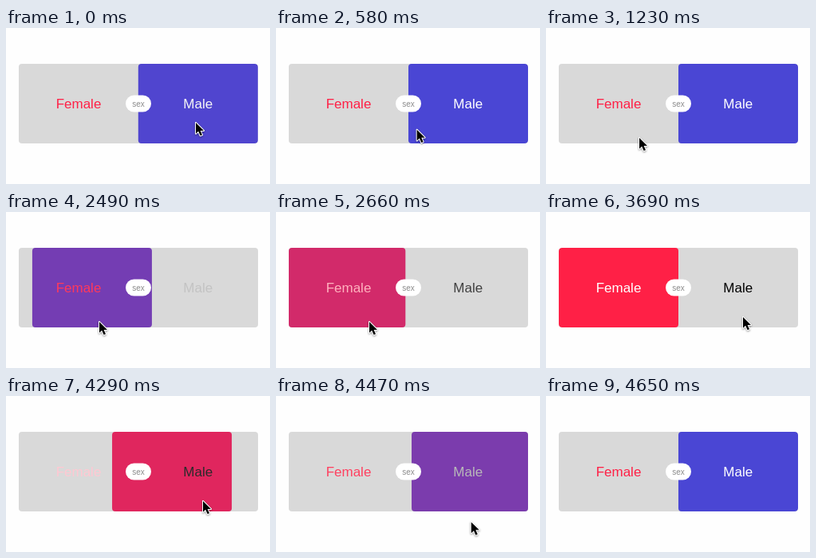
Write an HTML page that moves like this. It is 331 px wide and 196 px high and loops after 5.67 s.

```html
<!DOCTYPE html>
<html lang="en">
<head>
<meta charset="utf-8">
<title>Toggle</title>
<style>
  html, body { margin: 0; width: 100%; height: 100%; overflow: hidden; background: #fefefe; }
  svg { display: block; }
  text { font: 17px "Liberation Sans", Arial, sans-serif; text-anchor: middle; }
  .tag { font-size: 10px; fill: #8c8c8c; }
  #cursor { filter: drop-shadow(0 1px 1px #0006); }
</style>
</head>
<body>
<svg width="331" height="196" viewBox="0 0 331 196">
  <clipPath id="box"><rect x="16" y="45" width="300" height="100" rx="4"/></clipPath>
  <g clip-path="url(#box)">
    <rect x="16" y="45" width="300" height="100" fill="#d9d9d9"/>
    <rect id="slider" y="45" width="150" height="100" rx="4"/>
  </g>
  <text id="female" x="91" y="101">Female</text>
  <text id="male" x="240.7" y="101">Male</text>
  <rect x="150" y="84.5" width="32" height="21" rx="10.5" fill="#fff"/>
  <text class="tag" x="166" y="99">sex</text>
  <path id="cursor" d="M1 1V14.8L4.2 11.8 6.6 17.3 9 16.3 6.6 10.9H11Z"
    stroke="#fff" stroke-width="2" stroke-linejoin="round" paint-order="stroke"/>
</svg>
<script>
const LOOP = 5670, SLIDE = 440;
const BLUE = [74, 70, 212], RED = [255, 32, 70], WHITE = [255, 255, 255], BLACK = [0, 0, 0];

// Bursts of visible steps: start, end, count
const bursts = [[50, 110, 2], [410, 700, 6], [1050, 1230, 4], [2490, 3690, 22], [4290, 4650, 7]];
// Slide start times: to Male, to Female, to Male
const slides = [-365, 2424, 4242];
// Cursor stops: time, x, y
const stops = [
  [0, 237, 118], [360, 237, 118], [700, 153, 130], [1000, 153, 130],
  [1230, 116, 137], [2700, 116, 137], [3000, 193, 153], [3600, 238, 134],
  [3690, 246, 131], [4350, 246, 131], [4640, 240, 202], [LOOP, 240, 202]
];

const [slider, female, male, cursor] =
  ["slider", "female", "male", "cursor"].map(id => document.getElementById(id));
const lerp = (a, b, k) => a + (b - a) * k;
const mix = (a, b, k) => `rgb(${a.map((v, i) => Math.round(lerp(v, b[i], k)))})`;

// Hold still between bursts and step evenly inside them
function snap(t) {
  const burst = bursts.findLast(b => b[0] <= t);
  if (!burst) return 0;
  const [start, end, count] = burst;
  if (t >= end) return end + 99;
  const step = (end - start) / (count - 1);
  return start + Math.floor((t - start) / step + 0.1) * step;
}

function drawToggle(t) {
  const i = slides.findLastIndex(s => s <= t);
  const age = t - slides[i], u = Math.min(1, age / SLIDE);
  const move = 1 - Math.exp(-age / 34) + 0.065 * Math.sin(1.25 * Math.PI * u) * (1 - u);
  const fade = Math.sin(u * Math.PI / 2);
  const toFemale = i === 1;
  const red = toFemale ? fade : 1 - fade;
  slider.setAttribute("x", 166 - 150 * (toFemale ? move : 1 - move));
  slider.style.fill = mix(BLUE, RED, red);
  female.style.fill = mix(RED, WHITE, red ** 1.5);
  male.style.fill = mix(WHITE, BLACK, red);
}

function drawCursor(t) {
  const i = stops.findLastIndex(s => s[0] <= t);
  const a = stops[i], b = stops[i + 1];
  const u = (t - a[0]) / (b[0] - a[0]), k = u * u * (3 - 2 * u);
  cursor.setAttribute("transform", `translate(${lerp(a[1], b[1], k)} ${lerp(a[2], b[2], k)})`);
}

function frame() {
  const t = snap(performance.now() % LOOP);
  drawToggle(t);
  drawCursor(t);
  requestAnimationFrame(frame);
}
frame();
</script>
</body>
</html>
```
